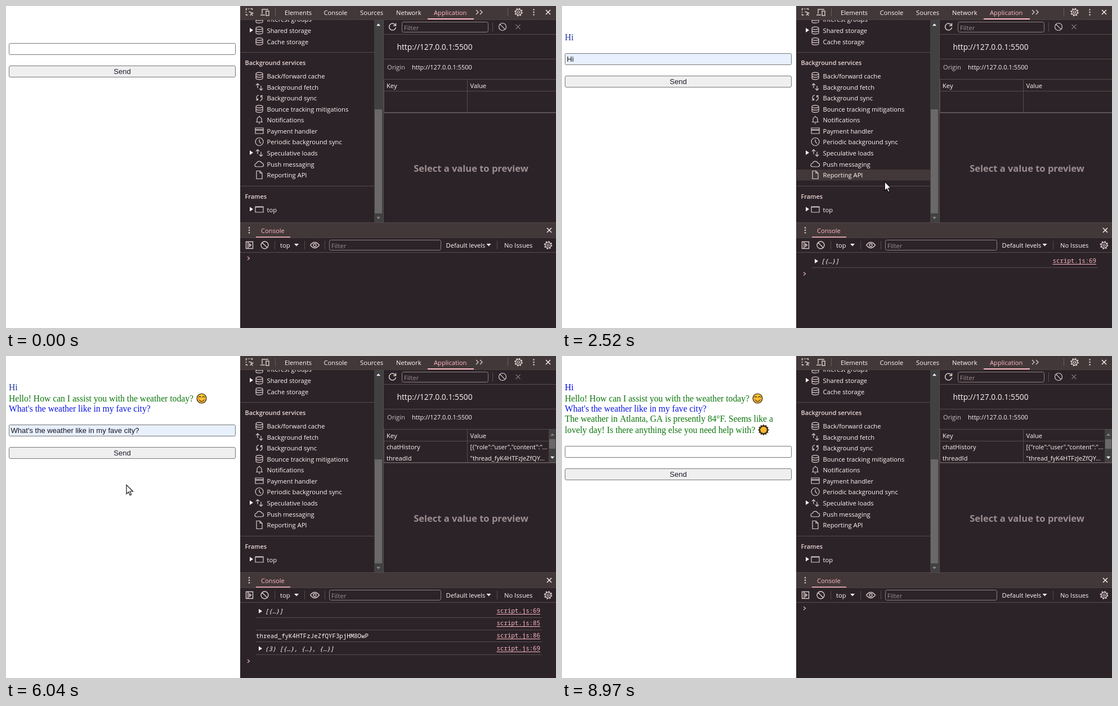
Recreate the animation shown at these times as an HTML page with a canvas. Size 977 by 573 pixels, loop 9.04 s.

```html
<!DOCTYPE html>
<html lang="en">
<head>
<meta charset="utf-8">
<title>Chat with developer tools</title>
<style>
html, body { margin: 0; width: 100%; height: 100%; overflow: hidden; background: #fff; }
canvas { display: block; }
</style>
</head>
<body>
<canvas id="stage" width="977" height="573"></canvas>
<script>
const ctx = document.getElementById('stage').getContext('2d');
const LOOP = 9040;
const BG = '#2c2328', BAR = '#433839', LINE = '#574b4d', TEXT = '#fff6f5', PINK = '#ffbac5', ICON = '#dccccc';
const SANS = '"Open Sans", "Noto Sans", sans-serif';
const UI = '11.2px ' + SANS, HEAD = '600 10.9px ' + SANS;
const MONO = '10.75px "Noto Sans Mono", "DejaVu Sans Mono", monospace';
const SERIF = '15.65px "Liberation Serif", serif';
const ARIAL = '13.05px "Liberation Sans", sans-serif';
const QUESTION = "What's the weather like in my fave city?";
const THREAD = 'thread_fyK4HTFzJeZfQYF3pjHM8OwP';
const AT = { fillHi: 1480, sendHi: 1950, hello: 2730, stored: 2870, pick: 4322, ask: 5630, answer: 6450, reload: 7750, gone: 8960 };

const ICONS = {
  db: 'M-6-4a6 2.3 0 0 1 12 0a6 2.3 0 0 1-12 0V4a6 2.3 0 0 0 12 0V-4M-6 0a6 2.3 0 0 0 12 0',
  swap: 'M-3 2V-6M-6-3L-3-6L0-3M3-2V6M0 3L3 6L6 3',
  sync: 'M-1-5A5 5 0 0 0-3 4M-6 4H-2.6V.8M1 5A5 5 0 0 0 3-4M6-4H2.6V-.8',
  bell: 'M-6 4H6M-4 4V-1a4 4 0 0 1 8 0V4M0-5V-7M-1.3 6.3H1.3',
  card: 'M-7-5H7V5H-7ZM-7-2H7M-7-1H7',
  clock: 'M-7 0a7 7 0 0 1 14 0a7 7 0 0 1-14 0M0-4V0L3 3',
  cloud: 'M-5 5a3 3 0 0 1 0-6a5 5 0 0 1 9.500-.5A3.300 3.300 0 0 1 5 5Z',
  doc: 'M-5-7H1L5-3V7H-5ZM1-7V-3H5',
  frame: 'M-7-5H7V5H-7ZM-7-4H7',
  block: 'M-6.500 0a6.500 6.500 0 0 1 13 0a6.500 6.500 0 0 1-13 0M-4.600-4.600L4.600 4.600',
  cross: 'M-4-4L4 4M4-4L-4 4',
  reload: 'M5.500-2.500A6 6 0 1 0 6 1M6-6.500V-2H1.500',
  inspect: 'M-6 3V5H-3M-6 1V-1M-6-3V-6H-4M-2-6H0M2-6H5V-4M-1-1L6 1.500L3 3L6 6M3 3L1.500 6Z',
  device: 'M-5 3V-5H6M-8 5H0M2-2H7V6H2Z',
  more: 'M-6-4L-2 0L-6 4M1-4L5 0L1 4',
  panel: 'M-6-6H6V6H-6ZM-2.500-6V6M0-2.500L3 0L0 2.500Z',
  eye: 'M-8 0Q0-10 8 0Q0 10-8 0M-2.500 0a2.500 2.500 0 0 1 5 0a2.500 2.500 0 0 1-5 0',
  prompt: 'M-2-3L1.500 0L-2 3'
};
const SIDE = [
  [24.4, 'db', 'Interest groups'], [44, 'db', 'Shared storage', 1], [63.5, 'db', 'Cache storage'],
  [125, 'db', 'Back/forward cache'], [144.5, 'swap', 'Background fetch'], [164, 'sync', 'Background sync'],
  [183.5, 'db', 'Bounce tracking mitigations'], [203, 'bell', 'Notifications'], [222.5, 'card', 'Payment handler'],
  [242, 'clock', 'Periodic background sync'], [262, 'swap', 'Speculative loads', 1], [281.5, 'cloud', 'Push messaging'],
  [301, 'doc', 'Reporting API'], [362.5, 'frame', 'top', 1]
];
// time, text, script line, centre, expandable
const LOGS = [
  [AT.sendHi, '[{…}]', 69, 454, 1], [AT.stored, '', 85, 476], [AT.stored, THREAD, 86, 497.5],
  [AT.ask, '(3) [{…}, {…}, {…}]', 69, 520.5, 1], [AT.answer, THREAD, 85, 543], [AT.answer, THREAD, 86, 564.5]
];
const OPTIONS = ['Hi', 'Yes', 'yes', "What's the weather like in my..."];
const FILLS = ['Hi', 'Yes', 'yes', QUESTION];
const POPUPS = [{ open: 930, close: AT.fillHi, top: 96 }, { open: 3740, close: AT.pick, top: 134 }];
const FADE = 150;
const PATH = [
  [50, 5, 560], [550, 150, 45], [800, 140, 75], [1050, 140, 76], [1350, 133, 117], [1640, 133, 117],
  [1850, 200, 118], [1960, 200, 118], [2300, 440, 225], [2520, 573, 312], [2750, 640, 455], [2900, 640, 450],
  [3500, 150, 112], [3800, 150, 114], [4200, 186, 262], [4420, 186, 271], [4690, 186, 260], [5200, 214, 155],
  [5640, 214, 157], [5900, 214, 225], [6060, 214, 230], [6300, 480, 450], [6580, 480, 255], [6900, 250, 130],
  [7190, 206, 67], [7450, 150, -25], [7850, 120, -25], [8100, 420, 60], [8420, 760, 165], [8600, 860, 172], [8960, 800, 535]
];

function rect(x, y, w, h, color) { ctx.fillStyle = color; ctx.fillRect(x, y, w, h); }
function hline(x, y, x2, color = LINE) { rect(x, y, x2 - x, 1, color); }
function vline(x, y, y2, color = LINE) { rect(x, y, 1, y2 - y, color); }
function text(s, x, y, font = UI, color = TEXT, align = 'left') {
  ctx.font = font; ctx.fillStyle = color; ctx.textAlign = align;
  ctx.fillText(s, x, y);
}
function box(x, y, w, h, r, fill, stroke, lw = 1) {
  ctx.beginPath(); ctx.roundRect(x, y, w, h, r);
  if (fill) { ctx.fillStyle = fill; ctx.fill(); }
  if (stroke) { ctx.strokeStyle = stroke; ctx.lineWidth = lw; ctx.stroke(); }
}
function poly(points, fill) {
  ctx.beginPath();
  points.forEach(([x, y]) => ctx.lineTo(x, y));
  ctx.closePath(); ctx.fillStyle = fill; ctx.fill();
}
function icon(name, x, y, color = ICON, lw = 1.2) {
  ctx.save(); ctx.translate(x, y);
  ctx.strokeStyle = color; ctx.lineWidth = lw;
  ctx.stroke(new Path2D(ICONS[name]));
  ctx.restore();
}
function disc(x, y, r, fill, stroke, lw = 1) {
  ctx.beginPath(); ctx.arc(x, y, r, 0, 7);
  if (fill) { ctx.fillStyle = fill; ctx.fill(); }
  if (stroke) { ctx.strokeStyle = stroke; ctx.lineWidth = lw; ctx.stroke(); }
}
function gear(x, y) {
  ctx.setLineDash([2.5, 2.4]); disc(x, y, 6.3, null, ICON, 2); ctx.setLineDash([]);
  disc(x, y, 5, null, ICON, 1.3); disc(x, y, 2, null, ICON, 1.2);
}
function dots(x, y) { [-4.5, 0, 4.5].forEach(d => disc(x, y + d, 1.3, ICON)); }
function arrow(x, y, dir, color = TEXT, s = 3.5) {
  poly([[x - s, y - dir * s / 2], [x + s, y - dir * s / 2], [x, y + dir * s / 1.6]], color);
}
function expander(x, y) { poly([[x - 2, y - 4], [x + 4, y], [x - 2, y + 4]], TEXT); }
function clip(x, y, w, h, draw) {
  ctx.save(); ctx.beginPath(); ctx.rect(x, y, w, h); ctx.clip(); draw(); ctx.restore();
}

function pointer(t) {
  const i = PATH.findIndex(p => p[0] > t);
  if (i < 1) return null;
  const [a, b] = [PATH[i - 1], PATH[i]], k = (t - a[0]) / (b[0] - a[0]);
  return { x: a[1] + (b[1] - a[1]) * k, y: a[2] + (b[2] - a[2]) * k };
}
function popupState(t) {
  const p = POPUPS.find(q => t >= q.open && t < q.close + FADE);
  if (!p) return null;
  const m = pointer(t), row = Math.floor((m.y - p.top - 4) / 35);
  return { top: p.top, p: Math.max(0, (t - p.close) / FADE), row: row >= 0 && row < 4 ? row : -1 };
}

function smile(x, y) {
  disc(x, y, 8.4, '#fcc433', '#49371b', 1.4);
  ctx.strokeStyle = '#49371b'; ctx.lineWidth = 1.3;
  [[-3.3, -1.5, 1.8, Math.PI, 0], [3.3, -1.5, 1.8, Math.PI, 0], [0, 1, 4.3, .35, 2.8]].forEach(([dx, dy, r, a, b]) => {
    ctx.beginPath(); ctx.arc(x + dx, y + dy, r, a, b); ctx.stroke();
  });
  disc(x - 5, y + 2, 1.5, '#f4814f'); disc(x + 5, y + 2, 1.5, '#f4814f');
}
function sun(x, y, core) {
  const star = (outer, inner) => Array.from({ length: 24 }, (_, i) => {
    const r = i % 2 ? inner : outer, a = i * Math.PI / 12;
    return [x + r * Math.cos(a), y + r * Math.sin(a)];
  });
  poly(star(10, 7.8), '#3c2f16');
  disc(x, y, 5.8, core);
}

function drawPage(t, popup) {
  rect(0, 0, 416, 573, '#fff');
  const green = '#0b750b', fresh = t >= AT.reload;
  let y = 66;
  if (t >= AT.sendHi) { y = 84; text('Hi', 5, 61, SERIF, fresh ? '#0000ee' : '#22379f'); }
  if (t >= AT.hello) {
    y = 105;
    text('Hello! How can I assist you with the weather today?', 5, 81, SERIF, green);
    smile(347.5, 75.5);
  }
  if (t >= AT.ask) { y = 122; text(QUESTION, 5, 99, SERIF, '#0a14e6'); }
  if (t >= AT.answer) {
    y = 160;
    text('The weather in Atlanta, GA is presently 84°F. Seems like a', 5, 117, SERIF, green);
    text('lovely day! Is there anything else you need help with?', 5, 137, SERIF, green);
    sun(358, 131.5, fresh ? '#fbb92c' : '#a87428');
  }
  let value = '';
  if (popup && popup.row >= 0) value = FILLS[popup.row];
  else if (t >= AT.fillHi && t < AT.hello) value = 'Hi';
  else if (t >= AT.pick && t < AT.answer) value = QUESTION;
  const focus = (t >= 870 && t < 1900) || (t >= 3640 && t < 5560);
  const fill = value ? '#e8f0fe' : '#fff';
  if (focus) box(6, y + 1, 401, 19, 2, fill, '#101018', 2);
  else box(5.5, y + .5, 402, 20, 2, fill, '#767676');
  text(value, 8.5, y + 15, ARIAL, '#15151c');
  if (focus && (!popup || popup.p) && t > AT.pick && (t - AT.pick) % 1000 < 500) vline(236, y + 3, y + 18, '#111');
  box(5.5, y + 40.5, 402, 20, 2.5, '#efefef', '#767676');
  text('Send', 206.5, y + 55, ARIAL, '#1b1b2c', 'center');
}

function drawPopup({ top, p, row }) {
  const s = 1 - .05 * p, cy = top + 74, alpha = Math.max(0, 1 - p);
  ctx.save();
  ctx.translate(219, cy); ctx.scale(s, s); ctx.translate(-219, -cy);
  ctx.globalAlpha = alpha;
  if (!p) { ctx.shadowColor = 'rgba(0,0,0,.3)'; ctx.shadowBlur = 4; ctx.shadowOffsetY = 1; }
  ctx.beginPath();
  ctx.roundRect(102, top, 234, 148, 6);
  ctx.moveTo(113, top); ctx.lineTo(122, top - 8); ctx.lineTo(131, top);
  ctx.fillStyle = '#24191d'; ctx.fill();
  ctx.shadowColor = 'transparent';
  // labels stay legible longer than the panel while it fades
  ctx.globalAlpha = Math.sqrt(alpha);
  OPTIONS.forEach((label, i) => {
    const y = top + 21.5 + i * 35.2;
    if (i === row) {
      box(106, y - 17.5, 227, 35, 4, 'rgba(255,235,235,.1)');
      icon('cross', 314.5, y, '#fff8f8', 1.6);
    }
    text(label, 113.5, y + 4.5, '600 12px ' + SANS, '#fff8f8');
  });
  ctx.restore();
}

function drawSidebar(hover) {
  clip(416, 24, 238, 361, () => {
    SIDE.forEach(([y, name, label, open]) => {
      if (hover && hover.x > 416 && hover.x < 653 && Math.abs(hover.y - y) < 9.8) rect(417, y - 10, 237, 19.5, BAR);
      if (open) expander(435, y - 1);
      icon(name, 450, y - .5);
      text(label, 463.5, Math.round(y + 4));
    });
    hline(417, 82, 654); hline(417, 320, 654);
    text('Background services', 424.5, 105, HEAD, '#ecd8d6');
    text('Frames', 424.5, 343, HEAD, '#ecd8d6');
  });
  rect(654, 24, 16, 361, '#424142');
  rect(655, 184, 13, 185, '#6a6869');
  arrow(661.5, 33.5, -1, '#fff'); arrow(661.5, 377, 1, '#8d8989');
}

function drawStorage(t, hover) {
  vline(670, 24, 385);
  icon('reload', 686.5, 37, ICON, 1.5);
  box(703.5, 28.5, 153, 18, 3, null, '#8f8083');
  text('Filter', 707, 43, UI, '#9c8d8f');
  vline(864, 29, 46);
  icon('block', 882, 37); icon('cross', 909.5, 37, '#7f7376');
  hline(671, 50, 977); hline(671, 94, 977);
  text('http://127.0.0.1:5500', 694.5, 78, '13.8px ' + SANS);
  text('Origin', 677, 113, UI, '#cfc0c1');
  text('http://127.0.0.1:5500', 721, 113, '11px ' + SANS);
  hline(671, 130, 977);
  text('Key', 676, 146); text('Value', 824.5, 146);
  if (t >= AT.stored) {
    clip(671, 131, 292, 58, () => {
      [['chatHistory', '[{"role":"user","content":"...', 152], ['threadId', '"thread_fyK4HTFzJeZfQY...', 172]].forEach(([key, val, y]) => {
        if (hover && hover.x > 671 && hover.x < 963 && hover.y >= y && hover.y < Math.min(y + 19.5, 189)) rect(672, y, 291, 19.5, BAR);
        text(key, 676, y + 14); text(val, 824.5, y + 14, '11px ' + SANS);
      });
    });
    rect(964, 131, 13, 58, '#424142');
    rect(965, 148, 11, 17, '#6a6869');
    arrow(970.5, 140, -1, '#8d8989'); arrow(970.5, 180.5, 1, '#fff');
  }
  hline(671, 151, t >= AT.stored ? 963 : 977);
  vline(671, 131, 189); vline(819, 131, 189);
  rect(671, 189, 306, 1.5, '#6b5f62');
  text('Select a value to preview', 826, 295, '700 16.5px ' + SANS, '#9b8d90', 'center');
}

function drawToolbars() {
  rect(416, 0, 561, 24, BAR);
  hline(416, 24, 977, '#4c4042');
  icon('inspect', 432.5, 11, ICON, 1.4); icon('device', 460, 11, ICON, 1.4);
  vline(478, 4, 18, '#6a5d5f');
  [['Elements', 495], ['Console', 564.5], ['Sources', 629], ['Network', 693]].forEach(([s, x]) => text(s, x, 16));
  text('Application', 760, 16, UI, PINK);
  rect(749, 22, 82, 2, PINK);
  icon('more', 841, 11, ICON, 1.3);
  vline(891, 4, 18, '#6a5d5f');
  gear(910.5, 11); dots(937.5, 11); icon('cross', 963, 11, TEXT, 1.4);

  rect(416, 385, 561, 27, BAR);
  hline(416, 385, 977, '#54484a');
  dots(432, 399);
  text('Console', 453, 404, UI, PINK);
  rect(444, 410.5, 61, 2, PINK);
  icon('cross', 965, 399, TEXT, 1.4);
  hline(416, 412, 977, '#4c4042'); hline(416, 438, 977);
  icon('panel', 432.5, 425.5, ICON, 1.4); icon('block', 459.5, 425.5, ICON, 1.4);
  [477, 530, 566, 872].forEach(x => vline(x, 418, 433));
  text('top', 487, 430); arrow(516, 425, 1, TEXT, 4);
  icon('eye', 548.5, 425.5, ICON, 1.3);
  box(574.5, 416.5, 198, 18, 3, null, '#8f8083');
  text('Filter', 578, 431, UI, '#9c8d8f');
  text('Default levels', 781.5, 430); arrow(857.5, 425, 1, TEXT, 4);
  text('No Issues', 885, 430);
  gear(963, 425.5);
}

function drawConsole(t) {
  const logs = t < AT.reload ? LOGS.filter(l => t >= l[0]) : [];
  const scrolled = logs.length > 4;
  const shift = scrolled ? 37.5 : 0, right = scrolled ? 936 : 952;
  clip(416, 439, 561, 134, () => {
    logs.forEach(([, label, line, cy, open]) => {
      const y = cy - shift, end = right - 3, link = 'script.js:' + line;
      if (open) expander(451, y);
      text(label, open ? 460 : 444, Math.round(y + 4), (open ? 'italic ' : '') + MONO);
      text(link, end, Math.round(y + 3), MONO, PINK, 'right');
      hline(end - 77.5, Math.round(y + 5), end, PINK);
      hline(444, Math.round(y + 10.5), right);
    });
    const py = logs.length ? logs[logs.length - 1][3] + 22.5 - shift : 449;
    icon('prompt', 431, py, '#dcabb2', 1.3);
    if (scrolled) {
      rect(964, 439, 13, 134, '#424142');
      rect(966, 478, 11, 82, '#6a6869');
      arrow(971, 448, -1, '#fff'); arrow(971, 567, 1, '#8d8989');
    }
  });
}

function drawPointer(t, m) {
  if ((t >= 1380 && t < 1480) || (t >= 4230 && t < AT.pick)) disc(m.x - 1, m.y - 1, 12, 'rgba(255,235,0,.6)');
  ctx.save(); ctx.translate(m.x, m.y);
  const shape = new Path2D('M0 0V16L3.700 12.600L6.300 18.300L8.700 17.200L6.200 11.600H11.400Z');
  ctx.lineWidth = 1.2; ctx.strokeStyle = '#111'; ctx.fillStyle = '#fff';
  ctx.fill(shape); ctx.stroke(shape);
  ctx.restore();
}

function draw(t) {
  const popup = popupState(t), mouse = t < AT.gone ? pointer(t) : null;
  const hover = mouse && pointer(t - 30); // row highlight trails the pointer
  drawPage(t, popup);
  rect(416, 0, 561, 573, BG);
  drawSidebar(hover);
  drawStorage(t, hover);
  drawToolbars();
  drawConsole(t);
  if (popup) drawPopup(popup);
  if (mouse) drawPointer(t, mouse);
}

const start = performance.now();
function tick() {
  draw((performance.now() - start) % LOOP);
  requestAnimationFrame(tick);
}
tick();
</script>
</body>
</html>
```
